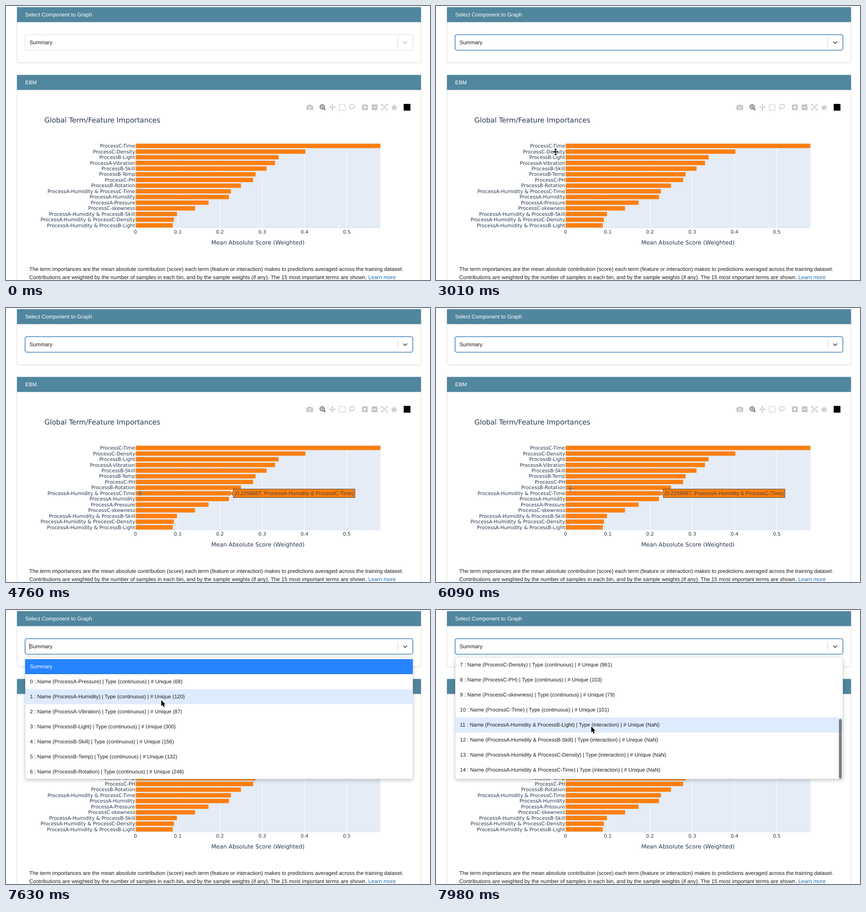
These frames come from a looping animation (930x602 px, 8 s). An HTML page with a canvas:

```html
<!DOCTYPE html>
<html lang="en">
<head>
<meta charset="utf-8">
<title>Term importances</title>
<style>
html, body { margin: 0; width: 100%; height: 100%; overflow: hidden; background: #fff; }
canvas { display: block; width: 930px; height: 602px; }
</style>
</head>
<body>
<canvas id="stage"></canvas>
<script>
const W = 930, H = 602, LOOP = 8000, TICK = 70;
const canvas = document.getElementById('stage');
const ctx = canvas.getContext('2d');
const dpr = window.devicePixelRatio || 1;
canvas.width = W * dpr;
canvas.height = H * dpr;
ctx.textRendering = 'geometricPrecision';

const SANS = '"Liberation Sans", Arial, sans-serif';
const WIDE = '"DejaVu Sans", Verdana, sans-serif';
const TEAL = '#50869e', ORANGE = '#ff7f0e', NAVY = '#283750', INK = '#1c1c1c';
const GREY = '#c4c4c4', BODY = 11.75;

const A = 'ProcessA-', B = 'ProcessB-', C = 'ProcessC-', HUM = A + 'Humidity';
const pair = name => `${HUM} & ${name}`;
const bars = Object.entries({
  [C + 'Time']: .5795862, [C + 'Density']: .4021, [B + 'Light']: .3388,
  [A + 'Vibration']: .3302, [B + 'Skill']: .3102, [B + 'Temp']: .2842,
  [C + 'PH']: .2784, [B + 'Rotation']: .2497, [pair(C + 'Time')]: .2258667,
  [HUM]: .2212, [A + 'Pressure']: .1729, [C + 'skewness']: .1409,
  [pair(B + 'Skill')]: .0983, [pair(C + 'Density')]: .0909, [pair(B + 'Light')]: .0882
});
const unique = {
  [A + 'Pressure']: 68, [HUM]: 120, [A + 'Vibration']: 87, [B + 'Light']: 300,
  [B + 'Skill']: 156, [B + 'Temp']: 132, [B + 'Rotation']: 248, [C + 'Density']: 861,
  [C + 'PH']: 103, [C + 'skewness']: 79, [C + 'Time']: 101
};
const pairs = [B + 'Light', B + 'Skill', C + 'Density', C + 'Time'].map(pair);
const items = ['Summary', ...[...Object.keys(unique), ...pairs].map((name, i) => {
  const n = unique[name];
  return `${i} : Name (${name}) | Type (${n ? 'continuous' : 'interaction'}) | # Unique (${n || 'NaN'})`;
})];

const plot = { x: 284, y: 301.3, r: 821.3, b: 488.3, unit: 926.8 };
plot.row = (plot.b - plot.y) / bars.length;
const menu = { x: 42, y: 104, w: 850.5, h: 267.5, pad: 4, item: 33, max: 268 };
const FOCUS = 1120, OPEN = 6930;

// pointer moves: start, end, x, y; it rests in between
const moves = [
  [0, 0, 390, 640], [0, 560, 358, 311], [700, 840, 341, 301], [1050, 1470, 329, 306.5],
  [2450, 2590, 236, 330], [2900, 3150, 300, 307], [3150, 3500, 212, 412],
  [3780, 4235, 294, 407], [5990, 6900, 315.5, 82], [7300, 7630, 340.5, 198],
  [7630, 7770, 340.5, 256]
];

function ramp(t, a, b) {
  const p = Math.min(1, Math.max(0, (t - a) / (b - a || 1)));
  return p * p * (3 - 2 * p);
}

function pointerAt(t) {
  let [, , x, y] = moves[0];
  for (const [from, to, nx, ny] of moves.slice(1)) {
    const p = ramp(t, from, to);
    x += (nx - x) * p;
    y += (ny - y) * p;
  }
  return { x, y };
}

const rowY = i => plot.y + (i + .49) * plot.row;
const barEnd = i => plot.x + bars[i][1] * plot.unit;

// the hover label trails the pointer by one tick
function hoveredBar(t) {
  if (t < FOCUS + TICK || t >= OPEN) return -1;
  const p = pointerAt(t - TICK);
  return bars.findIndex((b, i) =>
    p.x > plot.x && p.x < barEnd(i) && Math.abs(p.y - rowY(i)) < plot.row / 2);
}

function rect(x, y, w, h, fill) {
  ctx.fillStyle = fill;
  ctx.fillRect(x, y, w, h);
}

function box(x, y, w, h, r, fill, stroke, width = 1) {
  ctx.beginPath();
  ctx.roundRect(x, y, w, h, r);
  paint(fill, stroke, width);
}

function disc(x, y, r, fill, stroke, width) {
  ctx.beginPath();
  ctx.arc(x, y, r, 0, 2 * Math.PI);
  paint(fill, stroke, width);
}

function shape(points, fill, stroke, width, open) {
  ctx.beginPath();
  points.forEach(([x, y]) => ctx.lineTo(x, y));
  if (!open) ctx.closePath();
  paint(fill, stroke, width);
}

function paint(fill, stroke, width) {
  if (stroke) {
    ctx.strokeStyle = stroke;
    ctx.lineWidth = width;
  }
  if (fill) {
    ctx.fillStyle = fill;
    ctx.fill();
    ctx.shadowColor = 'transparent';
  }
  if (stroke) ctx.stroke();
}

function text(str, x, y, size, color, family = SANS, align = 'left') {
  ctx.font = `${size}px ${family}`;
  ctx.textAlign = align;
  ctx.fillStyle = color;
  ctx.fillText(str, x, y);
}

function shadow(color, blur, dy) {
  ctx.shadowColor = color;
  ctx.shadowBlur = blur * dpr;
  ctx.shadowOffsetY = dy * dpr;
}

function card(y, h, title) {
  shadow('rgba(0,0,0,.12)', 3, 1);
  box(24.3, y, 886, h, 4, '#fff', '#dfe1e6', .9);
  rect(24, y, 886.3, 33, TEAL);
  text(title, 42, y + 20.7, 11.85, '#fff');
}

function select(t) {
  const on = t >= FOCUS;
  box(41.8, 63, 850.6, 34.2, 4, '#fff', on ? '#4080b8' : '#d9d9d9', on ? 1.6 : .9);
  text('Summary', 51.5, 84, BODY, INK);
  rect(858.6, 70, 1, 20, '#ccc');
  shape([[871.3, 78.3], [875.6, 82.5], [879.9, 78.3]], null, on ? '#5c5c5c' : '#c8c8c8', 1.9, true);
  if (t >= 7350 && t < 7910) rect(51.3, 73, 1, 14, '#222');
}

function plus(size, width, color) {
  rect(-size / 2, -width / 2, size, width, color);
  rect(-width / 2, -size / 2, width, size, color);
}

function quarters(part) {
  for (let k = 0; k < 4; k++) {
    part();
    ctx.rotate(Math.PI / 2);
  }
}

const icons = [
  function zoom() {
    const dark = '#777';
    shape([[2, 2], [6, 6]], null, dark, 2.6);
    disc(-1, -1, 4.6, '#fff', dark, 2.2);
    ctx.translate(-1, -1);
    plus(4.8, 1.5, dark);
  },
  function pan() {
    plus(11, 1.4, GREY);
    quarters(() => shape([[7, 0], [4, -2.7], [4, 2.7]], GREY));
  },
  function marquee() {
    ctx.setLineDash([2, 1.5]);
    box(-6.5, -6, 13, 12.4, 0, null, GREY, 1.7);
  },
  function lasso() {
    ctx.beginPath();
    ctx.ellipse(0, -1.6, 6, 4.4, -.15, 0, 2 * Math.PI);
    paint(null, GREY, 1.4);
    shape([[-4.5, 1], [-2.3, 2.8], [-4, 6]], null, GREY, 1.4, true);
  },
  function zoomIn() {
    box(-6.3, -6.3, 12.6, 12.6, 1.6, GREY);
    plus(7.4, 1.8, '#fff');
  },
  function zoomOut() {
    box(-6.3, -6.3, 12.6, 12.6, 1.6, GREY);
    rect(-3.7, -.9, 7.4, 1.8, '#fff');
  },
  function autoscale() {
    quarters(() => {
      shape([[0, 0], [4, 4]], null, GREY, 1.5);
      shape([[2.4, 6], [6, 6], [6, 2.4]], null, GREY, 1.5, true);
    });
  },
  function home() {
    shape([[-6.4, .8], [0, -4.8], [6.4, .8]], null, GREY, 1.5, true);
    shape([[-4.4, 1], [0, -2.8], [4.4, 1], [4.4, 6], [-4.4, 6]], GREY);
    rect(-1.3, 2.4, 2.6, 3.6, '#fff');
  }
];

function modebar() {
  const y = 222.5;
  box(659, 218.5, 14.5, 10, 1.5, GREY);
  rect(663, 216.8, 6.4, 3, GREY);
  disc(666.2, 223.4, 2.6, GREY, '#fff', 1.2);
  icons.forEach((icon, i) => {
    ctx.save();
    ctx.translate(694.5 + i * 21.4 + (i > 3 ? 7 : 0), y);
    icon();
    ctx.restore();
  });
  rect(872.3, y - 7.4, 14.8, 14.8, '#000');
}

function chart() {
  const h = plot.b - plot.y, barH = plot.row * .77;
  text('Global Term/Feature Importances', 84.3, 256, 15.3, NAVY, WIDE);
  rect(plot.x, plot.y, plot.r - plot.x, h, '#e5ecf6');
  for (let i = 0; i <= 5; i++) {
    const x = plot.x + i * plot.unit / 10;
    rect(x - .5, plot.y, 1, h, '#fff');
    text(i / 10, x, 499.7, 10.7, NAVY, WIDE, 'center');
  }
  bars.forEach(([name], i) => {
    const y = rowY(i);
    rect(plot.x + .4, y - barH / 2, barEnd(i) - plot.x - .4, barH, ORANGE);
    text(name, 283.2, y + 3.7, 10.7, NAVY, WIDE, 'right');
  });
  text('Mean Absolute Score (Weighted)', 552.6, 523.6, 12.5, NAVY, WIDE, 'center');
}

function tooltip(i) {
  const size = 11.6, half = 9.3;
  const label = `(${bars[i][1].toFixed(7)}, ${bars[i][0]})`;
  const y = rowY(i), tip = barEnd(i);
  ctx.font = `${size}px ${SANS}`;
  const w = ctx.measureText(label).width + 5.6;
  const side = tip + w > 900 ? -1 : 1;
  const near = tip + side * 5.2, far = near + side * w;
  shape([[tip, y], [near, y - 5], [near, y - half], [far, y - half],
    [far, y + half], [near, y + half], [near, y + 5]], ORANGE, '#444', 1);
  text(label, Math.min(near, far) + 2.8, y + 4.1, size, '#444');
}

function notes() {
  const more = 'Contributions are weighted by the number of samples in each bin, and by the sample weights (if any). The 15 most important terms are shown. ';
  text('The term importances are the mean absolute contribution (score) each term (feature or interaction) makes to predictions averaged across the training dataset.', 51, 581.8, BODY, INK);
  text(more, 51, 600, BODY, INK);
  text('Learn more', 51 + ctx.measureText(more).width, 600, BODY, '#1a6bb0');
}

function dropdown(t, p) {
  const scroll = menu.max * ramp(t, 7690, 7960);
  ctx.save();
  shadow('rgba(0,0,0,.2)', 9, 3);
  box(menu.x, menu.y, menu.w, menu.h, 4, '#fff', 'rgba(0,0,0,.12)');
  ctx.clip();
  items.forEach((label, i) => {
    const y = menu.y + menu.pad + i * menu.item - scroll;
    const over = p.y > menu.y && p.y >= y && p.y < y + menu.item;
    if (!i || over) rect(menu.x, y, menu.w, menu.item, i ? '#deebff' : '#2684ff');
    text(label, 52.6, y + 20.3, 11.45, i ? INK : '#fff');
  });
  if (scroll > 0) box(883.7, menu.y + 1.5 + scroll / 2, 6.4, 131, 3.2, '#7d7d7d');
  ctx.restore();
}

function arrow() {
  const pts = [[0, 0], [0, 13.2], [3, 10.4], [5.1, 15.2], [7.4, 14.2], [5.3, 9.5], [9.5, 9.4]];
  shape(pts, null, '#fff', 2.4);
  shape(pts, '#000');
}

function cross() {
  plus(14, 2.2, 'rgba(255,255,255,.55)');
  plus(13, 1, '#222');
}

function resize() {
  rect(-5.5, -1, 11, 2, '#111');
  rect(-.8, -6, 1.6, 12, '#111');
  [-1, 1].forEach(d => shape([[0, d * 8], [-3, d * 4.5], [3, d * 4.5]], '#111'));
}

function pointer(t, p) {
  const onPlot = p.y > plot.y && p.y < plot.b && p.x < plot.r;
  ctx.save();
  ctx.translate(p.x, p.y);
  if (t < FOCUS || t >= OPEN || !onPlot) arrow();
  else if (p.x > plot.x - 2) cross();
  else resize();
  ctx.restore();
}

function draw(t) {
  const p = pointerAt(t), bar = hoveredBar(t);
  ctx.setTransform(dpr, 0, 0, dpr, 0, 0);
  rect(0, 0, W, H, '#fff');
  card(2.5, 121.7, 'Select Component to Graph');
  card(151.5, 500, 'EBM');
  select(t);
  modebar();
  chart();
  notes();
  if (bar >= 0) tooltip(bar);
  if (t >= OPEN) dropdown(t, p);
  pointer(t, p);
}

const start = performance.now();
function frame() {
  const t = (performance.now() - start) % LOOP;
  draw(Math.floor(t / TICK) * TICK);
  requestAnimationFrame(frame);
}
frame();
</script>
</body>
</html>
```
